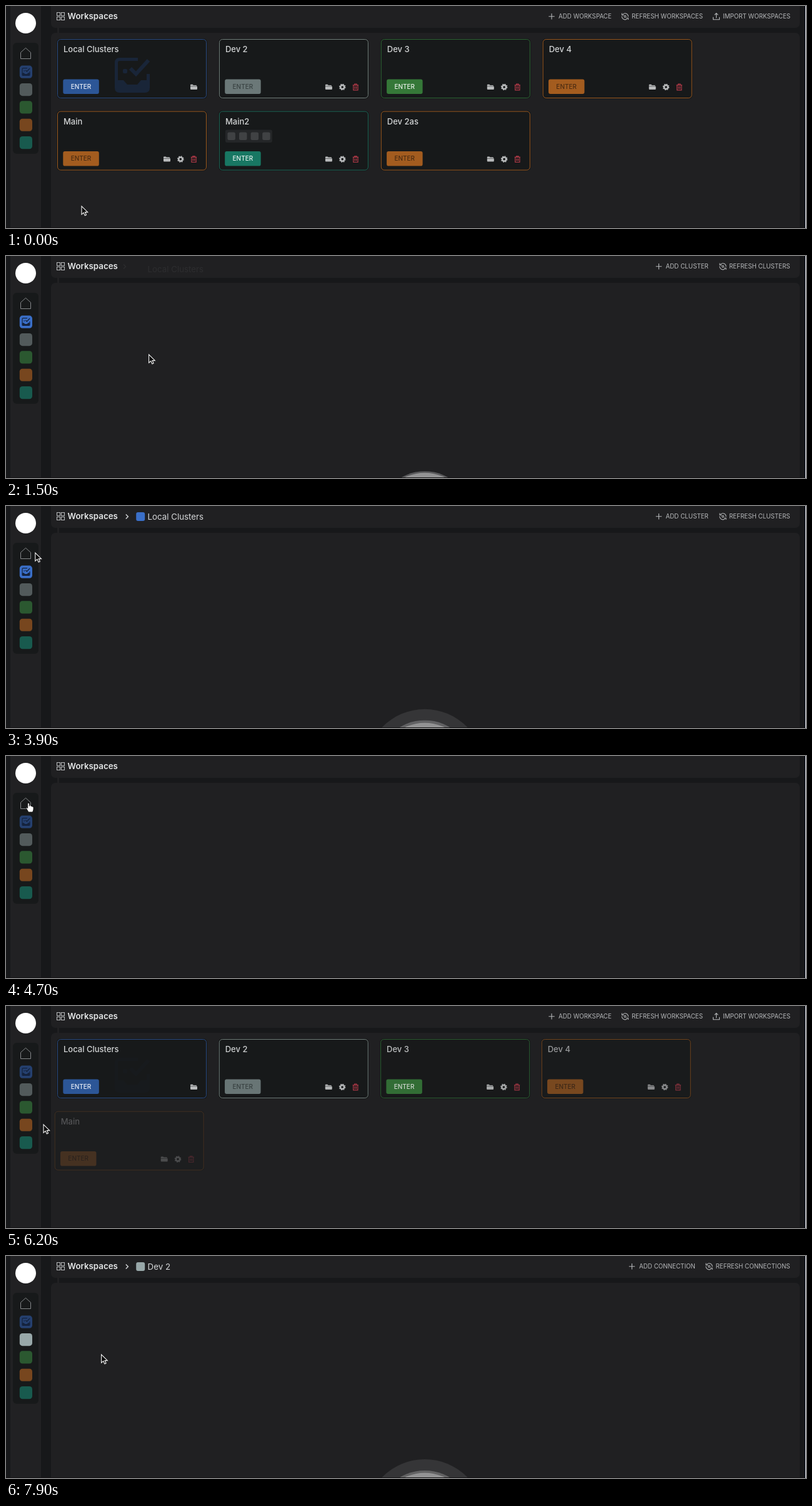
Write an HTML page that moves like this. It is 1280 by 356 pixels and loops after 8000 ms.

```html
<!DOCTYPE html>
<html lang="en">
<head>
<meta charset="utf-8">
<title>Workspaces</title>
<style>
html, body { margin: 0; width: 100%; height: 100%; overflow: hidden; background: #17181a; }
svg { display: block; width: 1280px; height: 356px; font-family: Inter, sans-serif; }
.title { font-size: 13px; font-weight: 500; fill: #d3d5d6; }
.head { font-size: 13.3px; font-weight: 600; fill: #e4e6e7; }
.crumb { font-size: 13.3px; fill: #d6d8da; }
.act { font-size: 9.8px; fill: #b6b8ba; }
.btn { font-size: 10px; font-weight: 500; text-anchor: middle; }
.tip { font-size: 11.5px; fill: #d3d5d6; }
.line { fill: none; stroke: #b6b8ba; stroke-width: 1.1; }
</style>
</head>
<body>
<svg id="stage" viewBox="0 0 1280 356">
  <defs>
    <g id="folder" fill="#b9bbbc">
      <path d="M-5.5 -3.2q0-1 1-1h2.6l1.2 1.2h4.4q1 0 1 1v.4h-10.2z"/>
      <path d="M-5.5 -1h11v4q0 1-1 1h-9q-1 0-1-1z"/>
    </g>
    <g id="gear">
      <circle r="3.1" fill="none" stroke="#b9bbbc" stroke-width="2.6"/>
      <circle r="4.7" fill="none" stroke="#b9bbbc" stroke-width="1.3" stroke-dasharray="1.85 1.84"/>
    </g>
    <g id="trash" fill="none" stroke="#b23a48" stroke-width="1.2">
      <path d="M-4.6 -3.2H4.6M-1.7 -3.4V-4.8H1.7V-3.4M-3.6 -3V4.9H3.6V-3M-1.2 -1.2V3M1.2 -1.2V3"/>
    </g>
    <g id="tray">
      <path d="M37 2.5H8Q2.5 2.5 2.5 8V48Q2.5 53.5 8 53.5H48Q53.5 53.5 53.5 48V26" fill="none" stroke="currentColor" stroke-width="5"/>
      <path d="M2 36H14L20 43H36L42 36H54V49Q54 54 49 54H7Q2 54 2 49Z" fill="currentColor"/>
      <rect x="13" y="18" width="7" height="7" rx="2" fill="currentColor"/>
      <path d="M25 17L34 26L54 4" fill="none" stroke="currentColor" stroke-width="6"/>
    </g>
    <g id="plus" class="line"><path d="M-4.7 0H4.7M0 -4.7V4.7"/></g>
    <g id="refresh" class="line">
      <path d="M-3.4 -3.6A5 5 0 0 1 5 0.4M3.4 3.6A5 5 0 0 1 -5 -0.4M-5 -5.2V-2.4H-2M5 5.2V2.4H2"/>
      <circle r="1.5"/>
    </g>
    <g id="import" class="line"><path d="M-5 1V5H5V1M0 2.5V-5M-2.8 -2.4L0 -5.2L2.8 -2.4"/></g>
  </defs>

  <rect width="1280" height="356" fill="#17181a"/>
  <rect x="7" y="-8" width="49" height="380" rx="6" fill="#212123"/>
  <rect x="11" y="59" width="41" height="178" rx="6" fill="#17191a"/>
  <circle cx="31.5" cy="27.5" r="16.5" fill="#fff"/>
  <path d="M23.5 74.5L31.5 67.3L39.5 74.5V84.5H23.5Z" fill="none" stroke="#85888a"/>
  <g id="side"></g>

  <rect x="72" y="-10" width="1198" height="45" rx="7" fill="#202022"/>
  <rect x="82" y="35" width="3" height="8" fill="#202022"/>
  <rect x="72" y="43" width="1198" height="330" rx="7" fill="#202022"/>
  <path d="M81.5 10.5h5v5h-5zM88.5 10.5h5v5h-5zM81.5 17.5h5v5h-5zM88.5 17.5h5v5h-5z" class="line"/>
  <text x="98.5" y="21.3" class="head">Workspaces</text>

  <g id="crumb">
    <path id="chev" d="M191.8 13.5L195.3 17L191.8 20.5" fill="none" stroke="#d0d2d4" stroke-width="1.5"/>
    <rect id="swatch" x="208.2" y="10" width="14" height="14" rx="3"/>
    <text id="name" x="226.6" y="21.8" class="crumb"></text>
  </g>
  <g id="acts"></g>
  <g id="cards"></g>
  <g id="load">
    <circle class="ring" cx="670" cy="421"/>
    <circle class="ring" cx="670" cy="421"/>
    <circle cx="670" cy="421" r="73.2" fill="#939394"/>
  </g>
  <rect y="355" width="1280" height="1" fill="#131214"/>
  <rect x="1278" width="1" height="356" fill="#0c1220"/>
  <rect x="1279" width="1" height="356" fill="#fff"/>
  <g id="tip">
    <rect id="tipBox" x="54" height="19" rx="4" fill="#17191a"/>
    <text id="tipText" x="59" class="tip"></text>
  </g>
  <g id="cursor">
    <path id="arrow" d="M0 0V13.2L3.2 10.4L5.3 15L7.5 14L5.5 9.6H9.7Z" fill="#0a0a0a" stroke="#f4f4f4" stroke-width="1.1"/>
    <path id="hand" d="M-1.3 1Q0-.6 1.3 1V5.5Q3 0 4 5.5Q5.6 4.6 6 6.2Q8 5.4 8 7.6V10.5Q7.6 12.5 6.6 15H-.2Q-1 12.5-3.4 9.5Q-4.3 7.6-2.7 7.5L-1.3 9Z" fill="#fff" stroke="#111" stroke-width=".9"/>
  </g>
</svg>
<script>
const $ = id => document.getElementById(id);
const set = (el, attrs) => { for (const k in attrs) el.setAttribute(k, attrs[k]); };
const clamp = v => Math.max(0, Math.min(1, v));
const ramp = (t, start, len) => clamp((t - start) / len);
const smooth = p => p * p * (3 - 2 * p);
const inOut = p => p < .5 ? 2 * p * p : 1 - 2 * (1 - p) * (1 - p);

const LOOP = 8000;
const OPEN_LOCAL = 1300, GO_HOME = 4700, OPEN_DEV = 6950;
const CARDS_IN = 5310, STAGGER = 179, CARD_TIME = 900;
const PULSE = 1570;

// CSS "ease": cubic-bezier(.25, .1, .25, 1)
function ease(x) {
  let lo = 0, hi = 1, s = .5;
  for (let i = 0; i < 18; i++) {
    s = (lo + hi) / 2;
    const bx = .75 * s * (1 - s) + s * s * s;
    if (bx < x) lo = s; else hi = s;
  }
  return .3 * s * (1 - s) * (1 - s) + 3 * s * s * (1 - s) + s * s * s;
}

const tones = {
  blue:   { edge: '#2a4a80', fill: '#2c5697', ink: '#e6ecf5' },
  grey:   { edge: '#74807d', fill: '#6b7878', ink: '#394242' },
  green:  { edge: '#2d6434', fill: '#357838', ink: '#e8f0e8' },
  orange: { edge: '#9a581f', fill: '#a35c1f', ink: '#4b2c12' },
  teal:   { edge: '#1c6657', fill: '#187763', ink: '#e2f0ec' }
};

const cards = [
  ['Local Clusters', 'blue'], ['Dev 2', 'grey'], ['Dev 3', 'green'], ['Dev 4', 'orange'],
  ['Main', 'orange'], ['Main2', 'teal'], ['Dev 2as', 'orange']
].map(([name, tone], i) => ({
  name, tone: tones[tone], x: 82.5 + 258.9 * (i % 4), y: 53.5 + 115.6 * Math.floor(i / 4)
}));

function cardMarkup({ name, tone }, i) {
  const icon = (id, x) => `<use href="#${id}" x="${x}" y="76.5"/>`;
  const icons = i ? icon('folder', 175) + icon('gear', 196.8) + icon('trash', 218) : icon('folder', 218);
  const mark = i ? '' : '<use id="mark" href="#tray" color="#192538" transform="translate(91.5 29.5)"/>';
  let chips = '';
  if (name === 'Main2') {
    chips = '<rect x="9.5" y="29.5" width="75" height="20.5" rx="3" fill="#242628"/>';
    for (let k = 0; k < 4; k++)
      chips += `<rect x="${13 + 18.6 * k}" y="33.5" width="12.5" height="12.5" rx="2.5" fill="#404244"/>`;
  }
  return `<g class="card"><rect x="-1.5" y="-1.5" width="241" height="97" rx="6" fill="#17191a"/>
    <rect width="238" height="94" rx="5" fill="#17191a" stroke="${tone.edge}"/>${mark}
    <text x="9.5" y="20.5" class="title">${name}</text>${chips}
    <rect x="8.8" y="64" width="57.5" height="23.5" rx="3" fill="${tone.fill}"/>
    <text x="37.5" y="79.4" class="btn" fill="${tone.ink}">ENTER</text>${icons}</g>`;
}
$('cards').innerHTML = cards.map(cardMarkup).join('');
const cardEls = [...document.querySelectorAll('.card')];

const sideTones = ['#25406f', '#525a5b', '#2b5830', '#77461e', '#185a4e'];
$('side').innerHTML = sideTones.map((c, i) =>
  `<rect class="sq" x="21.8" y="${95.6 + 28.35 * i}" width="20.2" height="20.2" rx="4.5" fill="${c}"/>`).join('') +
  '<use href="#tray" color="#14223c" transform="translate(25.5 99) scale(.232)"/>';
const squares = document.querySelectorAll('.sq');
const rings = document.querySelectorAll('.ring');

// Each action: icon, icon centre, label start, label
const pages = {
  home: { acts: [['plus', 873, 884, 'ADD WORKSPACE'], ['refresh', 990.5, 1001, 'REFRESH WORKSPACES'], ['import', 1136.5, 1147, 'IMPORT WORKSPACES']] },
  local: {
    name: 'Local Clusters', color: '#3a6fc8', start: OPEN_LOCAL, load: 1420,
    acts: [['plus', 1044.5, 1055.5, 'ADD CLUSTER'], ['refresh', 1147, 1157, 'REFRESH CLUSTERS']]
  },
  dev: {
    name: 'Dev 2', color: '#98a8a9', start: OPEN_DEV, load: 7000,
    acts: [['plus', 1001.5, 1013, 'ADD CONNECTION'], ['refresh', 1125, 1135.5, 'REFRESH CONNECTIONS']]
  }
};

// Pointer stops: time, x, y
const stops = [
  [0, 121, 321], [100, 118, 314], [500, 38, 109], [1300, 38, 109], [1500, 228.6, 158], [1700, 229, 157],
  [1950, 208, 146], [2450, 208, 146], [2700, 932, 50], [2900, 1195, 15], [3250, 1195, 15],
  [3600, 186, 60], [3750, 90, 42], [3900, 46.8, 75], [4150, 36, 75], [4700, 36, 75],
  [4950, 48, 84], [5330, 48, 84], [5600, 174, 252], [5750, 172, 250], [6200, 60, 190],
  [6450, 37, 137], [7000, 37, 137], [7400, 150, 170], [7700, 152.6, 158], [LOOP, 152.6, 158]
];

function pointer(t) {
  let i = 0;
  while (i < stops.length - 2 && stops[i + 1][0] <= t) i++;
  const [t0, x0, y0] = stops[i], [t1, x1, y1] = stops[i + 1];
  const p = smooth(clamp((t - t0) / (t1 - t0)));
  return [x0 + (x1 - x0) * p, y0 + (y1 - y0) * p];
}

let shown = null;
function showPage(page) {
  if (page === shown) return;
  shown = page;
  $('acts').innerHTML = page.acts.map(([id, ix, x, label]) =>
    `<use href="#${id}" x="${ix}" y="16.8"/><text x="${x}" y="20.3" class="act">${label}</text>`).join('');
  $('name').textContent = page.name || '';
  if (page.color) set($('swatch'), { fill: page.color });
  set(squares[0], { fill: page === pages.local ? page.color : sideTones[0] });
  set(squares[1], { fill: page === pages.dev ? page.color : sideTones[1] });
}

function drawCrumb(t, page) {
  set($('crumb'), { display: page.name ? 'inline' : 'none' });
  if (!page.name) return;
  const p = inOut(ramp(t, page.start + 100, 550));
  const q = inOut(ramp(t, page.start + 190, 450));
  set($('chev'), { opacity: p, transform: `translate(${-4 * (1 - p)} 0)` });
  set($('swatch'), { opacity: q });
  set($('name'), { opacity: p, transform: `translate(0 ${4 * (1 - p)})` });
}

function drawLoader(t, page) {
  const age = t - page.load;
  set($('load'), { display: age >= 0 ? 'inline' : 'none' });
  if (!(age >= 0)) return;
  rings.forEach((ring, i) => {
    const a = age - PULSE / 2 * i, f = (Math.max(a, 0) % PULSE) / PULSE;
    set(ring, {
      r: 73 + 26 * (1 - Math.pow(1 - f, 2.2)),
      fill: '#979798',
      opacity: a < 0 ? 0 : .52 * Math.pow(1 - f, 1.25)
    });
  });
}

function drawCards(t, page) {
  set($('cards'), { display: page === pages.home ? 'inline' : 'none' });
  cards.forEach((c, i) => {
    const p = t < OPEN_LOCAL ? 1 : ease(ramp(t, CARDS_IN + STAGGER * i, CARD_TIME));
    set(cardEls[i], { opacity: p, transform: `translate(${c.x - 6 * (1 - p)} ${c.y})` });
  });
  set($('mark'), { opacity: t < OPEN_LOCAL ? 1 : ramp(t, 6100, 900) });
}

function drawTip(t) {
  const first = t < 3000;
  const alpha = first ? ramp(t, 600, 250) * (1 - ramp(t, OPEN_LOCAL, 120))
                      : ramp(t, 6670, 250) * (1 - ramp(t, 7020, 120));
  const y = first ? 105.5 : 134;
  set($('tip'), { opacity: alpha });
  set($('tipBox'), { y: y - 9.5, width: first ? 85 : 42 });
  set($('tipText'), { y: y + 4 });
  $('tipText').textContent = first ? 'Local Clusters' : 'Dev 2';
}

function draw(t) {
  const page = t < OPEN_LOCAL ? pages.home : t < GO_HOME ? pages.local : t < OPEN_DEV ? pages.home : pages.dev;
  showPage(page);
  const since = t < OPEN_LOCAL ? LOOP : t - (page.start || GO_HOME);
  const p = smooth(ramp(since, 0, 180));
  set($('acts'), { opacity: p, transform: `translate(0 ${-8 * (1 - p)})` });
  drawCrumb(t, page);
  drawLoader(t, page);
  drawCards(t, page);
  drawTip(t);

  const [x, y] = pointer(t);
  const onAction = page === pages.local && y < 30 && x > 1138;
  const hand = x < 43 || onAction;
  set($('cursor'), { transform: `translate(${x} ${y})` });
  set($('hand'), { display: hand ? 'inline' : 'none' });
  set($('arrow'), { display: hand ? 'none' : 'inline' });
  $('acts').lastElementChild.style.fill = onAction ? '#f0f1f2' : '';
}

const began = performance.now();
function tick() {
  draw((performance.now() - began) % LOOP);
  requestAnimationFrame(tick);
}
tick();
</script>
</body>
</html>
```
